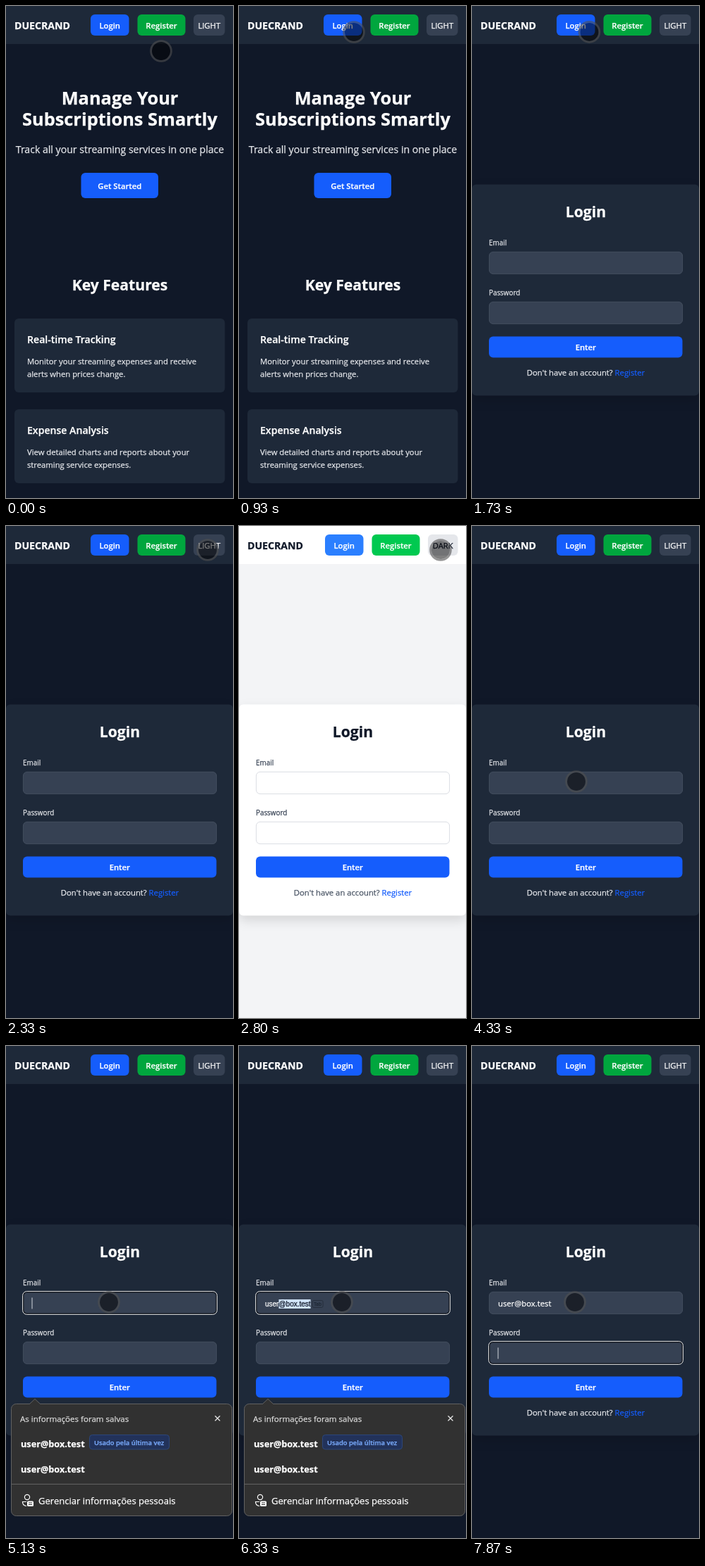
Animation, 322 px wide and 699 px high, one loop 8000 ms. Source, as an HTML page:

```html
<!DOCTYPE html>
<html lang="en">
<head>
<meta charset="utf-8">
<title>Subscription tracker login</title>
<style>
html, body { margin: 0; width: 100%; height: 100%; overflow: hidden; background: #101828; }
svg { display: block; width: 322px; height: 699px; font-family: "Open Sans", "Noto Sans", sans-serif; }
text { stroke-width: .25px; }
.card { filter: drop-shadow(0 7px 8px rgba(0, 0, 0, .12)); }
</style>
</head>
<body>
<svg id="stage" viewBox="0 0 322 699"></svg>
<script>
const LOOP = 8000, BRAND = 'DUECRAND', EMAIL = 'user@box.test';
const DARK = {
  page: '#101828', panel: '#1e2939', ink: '#fff', soft: '#e5e7eb', login: '#155dfc', reg: '#00a63e',
  toggle: '#364153', mode: 'LIGHT', field: '#364153', edge: '#4a5565'
};
const LIGHT = {
  page: '#f3f4f6', panel: '#fff', ink: '#101828', soft: '#364153', login: '#2b7fff', reg: '#00c950',
  toggle: '#e5e7eb', mode: 'DARK', field: '#fff', edge: '#d1d5dc'
};
// pointer stops: time, x, y
const PATH = [[0, 220, 64], [867, 162.5, 36.5], [933, 163, 37], [1667, 163, 37], [2333, 286, 34],
  [3533, 286, 34], [3600, 272, 52], [4333, 148, 363], [4400, 148, 363], [4533, 146, 364], [LOOP, 146, 364]];
const KEYS = [5870, 6000, 6200, 6330];

const stage = document.getElementById('stage');
const pen = document.createElement('canvas').getContext('2d');
pen.font = '10px "Liberation Sans", Arial, sans-serif';
const width = s => pen.measureText(s).width;

const rect = (x, y, w, h, fill, r = 0, more = '') =>
  `<rect x="${x}" y="${y}" width="${w}" height="${h}" rx="${r}" fill="${fill}" ${more}/>`;
const text = (s, x, y, size, fill, weight = 400, more = '') =>
  `<text x="${x}" y="${y}" font-size="${size * .94}" fill="${fill}" stroke="${fill}" font-weight="${weight}" ${more}>${s}</text>`;
const mid = (s, x, y, size, fill, weight) => text(s, x, y, size, fill, weight, 'text-anchor="middle"');
const button = (s, x, y, w, h, fill, ink = '#fff', weight = 600) =>
  rect(x, y, w, h, fill, 6) + mid(s, x + w / 2, y + h / 2 + 4.5, 12, ink, weight);
const line = (d, color, w = 1) => `<path d="${d}" fill="none" stroke="${color}" stroke-width="${w}"/>`;

function header(c) {
  const shift = c === LIGHT ? 2 : 0;
  return rect(0, 0, 322, 54, c.panel) + text(BRAND, 12, 33, 15, c.ink, 700) +
    button('Login', 120 + shift, 12, 54.5, 30, c.login) +
    button('Register', 186.5 + shift, 12, 68, 30, c.reg) +
    button(c.mode, 266 + shift, 12, 44.5 - shift, 30, c.toggle, c.ink, 400);
}

function feature(y, title, ...rows) {
  return rect(12, y, 298.5, 105, DARK.panel, 6) + text(title, 30, y + 35, 15, '#fff', 600) +
    rows.map((s, i) => text(s, 30, y + 65 + 18 * i, 12, DARK.soft)).join('');
}

function home() {
  return mid('Manage Your', 161.5, 140, 27, '#fff', 700) +
    mid('Subscriptions Smartly', 161.5, 170, 27, '#fff', 700) +
    mid('Track all your streaming services in one place', 161.5, 209, 15, DARK.soft) +
    button('Get Started', 106.5, 237, 109.5, 36, DARK.login) +
    mid('Key Features', 161.5, 404, 22.5, '#fff', 700) +
    feature(444, 'Real-time Tracking', 'Monitor your streaming expenses and receive', 'alerts when prices change.') +
    feature(573, 'Expense Analysis', 'View detailed charts and reports about your', 'streaming service expenses.');
}

function field(label, y, c, focus) {
  const ring = focus
    ? rect(24.7, y + .7, 273.6, 30.6, 'none', 5, 'stroke="#10141c" stroke-width="1.4"') +
      rect(23.6, y - .4, 275.8, 32.8, 'none', 6, 'stroke="#e6e6e6"')
    : '';
  return text(label, 24, y - 9, 10.5, c.soft, 500) +
    rect(24.4, y + .4, 274.2, 31.2, c.field, 5.6, `stroke="${c.edge}" stroke-width=".8"`) + ring;
}

const caret = y => line(`M37 ${y + 8.5}v16`, '#d1d5dc');

function preview(count) {
  const typed = EMAIL.slice(0, count), rest = EMAIL.slice(count);
  const x = 37 + width(typed), end = x + width(rest);
  const arial = 'style="font:10px Liberation Sans,Arial,sans-serif"';
  return text(typed, 37, 370, 10, '#fff', 400, arial) +
    rect(x, 360, end - x, 13, '#cfe2f7') + text(rest, x, 370, 10, '#101828', 400, arial) +
    rect(end + 2.5, 361.5, 15, 10, 'none', 2, 'stroke="#262f3d"') + mid('Tab', end + 10, 369, 7, '#1f2835');
}

function login(c, t) {
  const done = t >= 7670, next = t >= 7730, typed = KEYS.filter(k => t >= k).length;
  const link = '<tspan fill="#155dfc" stroke="#155dfc">Register</tspan>';
  let s = `<g class="card">${rect(0, 253.5, 322, 300, c.panel, 6)}</g>` +
    mid('Login', 161.5, 300, 22.5, c.ink, 700) +
    field('Email', 349, c, t >= 4930 && !next) + field('Password', 420, c, next) +
    button('Enter', 24, 469.5, 274.5, 30, '#155dfc') +
    mid(`Don't have an account? ${link}`, 161.5, 525, 12, c === LIGHT ? '#4a5565' : c.soft);
  if (done) s += text(EMAIL, 37, 370, 12, '#fff');
  else if (typed) s += preview(typed);
  else if (t >= 4930 && t < 5470) s += caret(349);
  if (next) s += caret(420);
  return s + (t >= 5130 && !done ? popup() : '');
}

function popup() {
  const bg = '#313131', edge = '#626262';
  return rect(7.5, 508.5, 313, 159, bg, 7, `stroke="${edge}"`) +
    `<path d="M33 509L41 501.5L49 509" fill="${bg}" stroke="${edge}"/>` + rect(33, 509, 16, 2, bg) +
    text('As informações foram salvas', 20, 534, 12.3, '#dadada') +
    line('M296.5 525.5l7 7m0 -7l-7 7', '#eee', 1.2) +
    text(EMAIL, 21, 570, 13.5, '#fff', 700) +
    rect(118.5, 552.5, 113, 20.5, '#22325a', 4, 'stroke="#2c4679"') +
    text('Usado pela última vez', 125, 566.5, 10, '#78a9fa', 600) +
    text(EMAIL, 21, 606, 13.5, '#fff', 700) +
    line('M8 622.5H320', edge) +
    '<circle cx="30" cy="641" r="3.6" fill="none" stroke="#fff" stroke-width="1.2"/>' +
    line('M29 653.5Q23.5 653 23.5 647.5H29', '#fff', 1.2) +
    rect(30, 646.5, 9, 7.5, '#fff', 1.5) + line('M32 649h5m-5 2.5h5', bg) +
    text('Gerenciar informações pessoais', 46, 651, 13.9, '#fff');
}

function pointer(t) {
  const now = Math.floor((t + 4) * .015) / .015 + .5;
  const i = Math.max(1, PATH.findIndex(p => p[0] > now));
  const [t0, x0, y0] = PATH[i - 1], [t1, x1, y1] = PATH[i];
  const p = Math.min(1, (now - t0) / (t1 - t0)), e = p * p * (3 - 2 * p);
  const at = `cx="${x0 + (x1 - x0) * e}" cy="${y0 + (y1 - y0) * e}"`;
  return `<circle ${at} r="13" opacity=".5"/>` +
    `<circle ${at} r="14.4" fill="none" stroke="#505050" stroke-width="2.8" opacity=".6"/>`;
}

let shown = '';
function draw() {
  const t = performance.now() % LOOP;
  const c = t >= 2800 && t < 3600 ? LIGHT : DARK;
  const art = rect(0, 0, 322, 699, c.page) + header(c) + (t < 1730 ? home() : login(c, t)) + pointer(t);
  if (art !== shown) stage.innerHTML = shown = art;
  requestAnimationFrame(draw);
}
draw();
</script>
</body>
</html>
```
